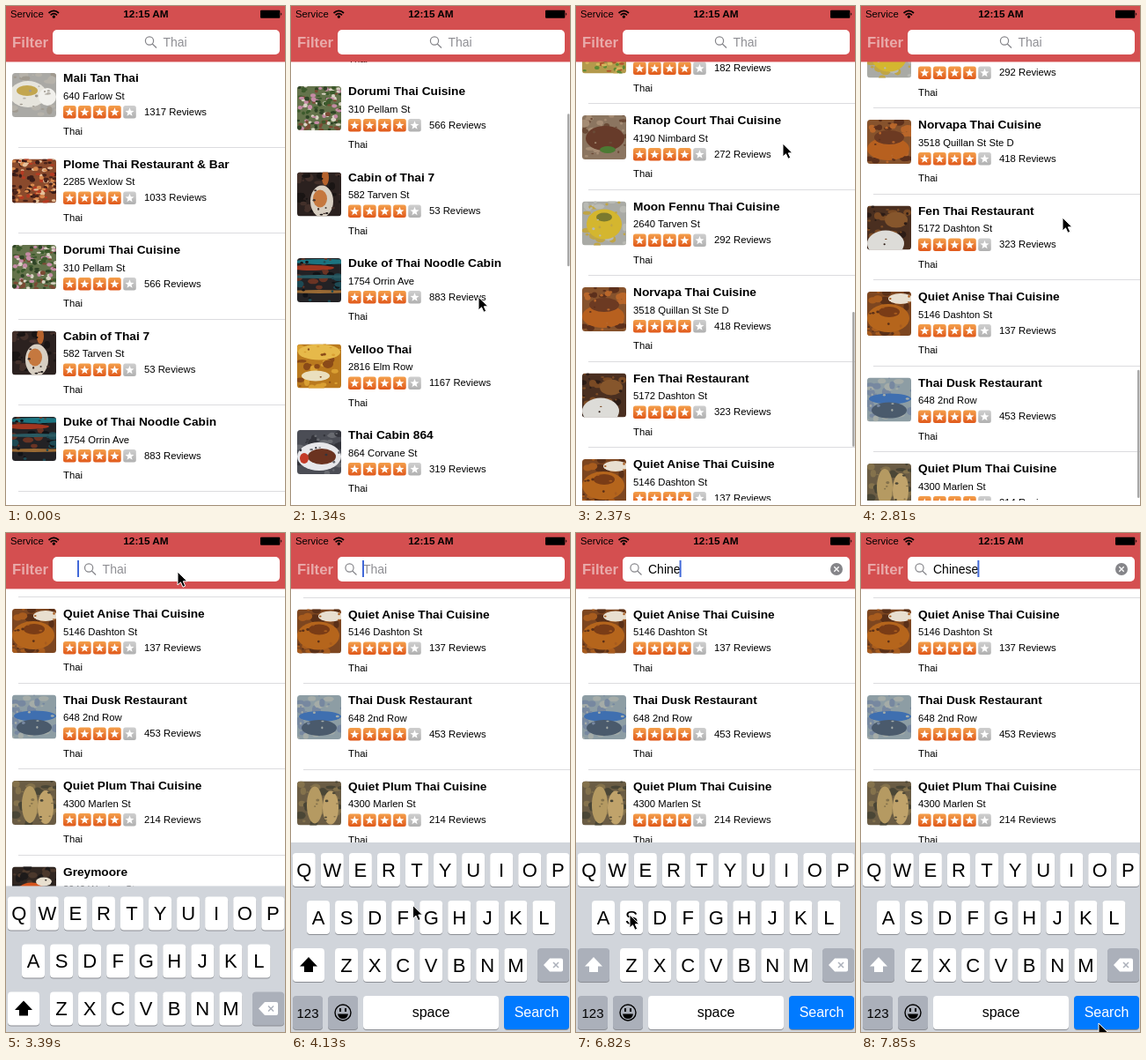
These frames come from a looping animation (317 px wide and 566 px high, 8 s). An HTML page:

```html
<!DOCTYPE html>
<html lang="en">
<head>
<meta charset="utf-8">
<title>Restaurant search</title>
<style>
  html, body { margin: 0; width: 100%; height: 100%; overflow: hidden; background: #fff; }
  svg { display: block; width: 317px; height: 566px; }
  text { font-family: "Liberation Sans", Arial, sans-serif; font-size: 11.3px; fill: #000; white-space: pre; }
  .name { font-size: 13.7px; font-weight: bold; }
  .field { font-size: 14px; }
  .hint { fill: #8e8e93; }
  .clock { font-size: 11.8px; font-weight: bold; text-anchor: middle; }
  .filter { font-size: 16.8px; font-weight: bold; fill: #e9abaa; }
  .key { font-size: 22px; text-anchor: middle; }
  .label { font-size: 16px; text-anchor: middle; }
</style>
</head>
<body>
<svg viewBox="0 0 317 566">
  <defs>
    <clipPath id="listClip"><rect y="63" width="317" height="498"/></clipPath>
    <clipPath id="photoClip"><rect width="50" height="50" rx="3.5"/></clipPath>
    <filter id="soft"><feGaussianBlur stdDeviation=".7"/></filter>
    <linearGradient id="orange" x2="0" y2="1">
      <stop stop-color="#f4a04c"/><stop offset="1" stop-color="#e0581a"/>
    </linearGradient>
    <linearGradient id="grey" x2="0" y2="1">
      <stop stop-color="#cfcfcf"/><stop offset="1" stop-color="#b0b0b0"/>
    </linearGradient>
    <path id="star" fill="#fff" d="M7.3 2.3 8.6 5.8 12.3 5.9 9.4 8.2 10.4 11.8 7.3 9.7 4.2 11.8 5.2 8.2 2.3 5.9 6 5.8Z"/>
    <g id="stars"></g>
  </defs>

  <g clip-path="url(#listClip)">
    <g id="list"><g id="lines" fill="#dcdcdf" shape-rendering="crispEdges"></g></g>
    <rect id="bar" x="314" width="2.5" rx="1.2" fill="#a8a8a8"/>
  </g>

  <rect width="317" height="63.4" fill="#d44f50"/>
  <text x="5" y="13.3">Service</text>
  <g fill="none" stroke="#000" stroke-width="1.7">
    <path d="M48.5 8Q54.3 2.8 60 8M50.6 10.3Q54.3 7 58 10.3"/>
    <circle cx="54.3" cy="12.2" r=".8"/>
  </g>
  <text class="clock" x="159" y="13.4">12:15 AM</text>
  <path d="M290 4.7h20.3q1 0 1 1v7q0 1-1 1h-20.3q-1 0-1-1v-7q0-1 1-1M312.3 7.5q2 1.700 0 3.4"/>
  <text class="filter" x="7" y="47">Filter</text>
  <rect x="53" y="27" width="258" height="28" rx="5" fill="#fff"/>
  <g id="hint">
    <g fill="none" stroke="#85858a" stroke-width="1.2"><circle cx="163" cy="39.5" r="4.6"/><path d="M166.3 43 171 47.5"/></g>
    <text id="placeholder" class="field hint" x="178.5" y="46">Thai</text>
  </g>
  <text id="query" class="field" x="82" y="46"></text>
  <rect id="caret" y="31" width="2" height="19" fill="#4168d8"/>
  <g id="clear">
    <circle cx="296" cy="41" r="7" fill="#858589"/>
    <path d="M293.3 38.3l5.4 5.4m0-5.4l-5.4 5.4" stroke="#fff" stroke-width="1.3"/>
  </g>

  <g id="keyboard"><rect y="351" width="317" height="215" fill="#d1d5db"/></g>
  <path id="cursor" d="M0 0V15L3.5 11.8 6 17.3 8.7 16.1 6.3 10.8H11Z" stroke="#fff"/>
</svg>

<script>
const FRAMES = 54, LOOP = 8000, PITCH = 97.5;
const $ = id => document.getElementById(id);

function add(parent, tag, attrs, text) {
  const node = document.createElementNS("http://www.w3.org/2000/svg", tag);
  for (const name in attrs) node.setAttribute(name, attrs[name]);
  if (text) node.textContent = text;
  return parent.appendChild(node);
}

// name, address, reviews, background, speck colours, ellipses [fill, cx, cy, rx, ry]
const rows = [
  ["Mali Tan Thai", "640 Farlow St", "1317", "#aaa9a5", "#a09a90 #b6b2aa", ["#e6e4dc", 18, 24, 21, 15], ["#c3a64f", 17, 20, 12, 6], ["#f1f0ec", 40, 27, 10, 10]],
  ["Plome Thai Restaurant & Bar", "2285 Wexlow St", "1033", "#8a4a2c", "#d98a4e #4a231a #e6c09a #b53b22 #3a1c18"],
  ["Dorumi Thai Cuisine", "310 Pellam St", "566", "#64734b", "#3c5a2c #c58ba5 #d9d4c4 #7a4a34 #2f4426"],
  ["Cabin of Thai 7", "582 Tarven St", "53", "#2b211f", "#43302a #1a1514", ["#d8cfc2", 28, 33, 13, 18], ["#c5783f", 26, 30, 8, 10], ["#b5622c", 32, 6, 4, 9]],
  ["Duke of Thai Noodle Cabin", "1754 Orrin Ave", "883", "#232225", "#1e4a54 #6a3424 #111317", ["#1c7480", 30, 4, 34, 3], ["#a2361f", 16, 11, 26, 3], ["#2a5a62", 25, 21, 34, 2], ["#9a6a34", 25, 38, 34, 2]],
  ["Velloo Thai", "2816 Elm Row", "1167", "#b9791e", "#d99f32 #8a4a18", ["#e6b94a", 25, 9, 24, 9], ["#eadfbe", 21, 36, 16, 6]],
  ["Thai Cabin 864", "864 Corvane St", "319", "#4b4d55", "#33343b #686a70", ["#e7e7ea", 25, 30, 25, 16], ["#6b3320", 28, 30, 16, 9], ["#c33a27", 8, 32, 5, 6]],
  ["Pomelu Thai Kitchen", "947 Brellin St", "205", "#9a6a3a", "#c99a55 #5c3a20"],
  ["Tavoo Thai Garden", "1530 Pellam St", "182", "#b49a4c", "#5d8a34 #d6b65c #b0532c"],
  ["Ranop Court Thai Cuisine", "4190 Nimbard St", "272", "#8b7560", "#6a4a36 #a58c74", ["#673b2a", 26, 26, 22, 14], ["#4c7a33", 29, 39, 9, 4]],
  ["Moon Fennu Thai Cuisine", "2640 Tarven St", "292", "#a9aaa5", "#c0a546 #b9bab4", ["#d4b62f", 25, 26, 20, 17], ["#7b7a2e", 25, 18, 9, 5]],
  ["Norvapa Thai Cuisine", "3518 Quillan St Ste D", "418", "#86522c", "#b8662a #5c301c", ["#b7601f", 24, 33, 24, 13], ["#6c3a22", 25, 20, 17, 8]],
  ["Fen Thai Restaurant", "5172 Dashton St", "323", "#4a2f20", "#7a4a24 #2c1c16", ["#dddcd8", 21, 43, 21, 15], ["#86562c", 33, 16, 13, 9]],
  ["Quiet Anise Thai Cuisine", "5146 Dashton St", "137", "#7d4620", "#a85c1e #5a3018", ["#e8dfd0", 38, 8, 14, 6], ["#b5651c", 24, 30, 24, 16], ["#7a3c16", 25, 23, 12, 6]],
  ["Thai Dusk Restaurant", "648 2nd Row", "453", "#8d9da4", "#7788a0 #a5aca8", ["#3f6fb0", 26, 24, 24, 6], ["#4a5a6c", 25, 37, 20, 9]],
  ["Quiet Plum Thai Cuisine", "4300 Marlen St", "214", "#6a5c44", "#84724c #4a4636", ["#b59a62", 20, 27, 9, 21], ["#c0a36b", 38, 30, 9, 19]],
  ["Greymoore", "3940 Wexlow St", "640", "#302621", "#4b382c #1d1a1a", ["#d5541d", 22, 32, 18, 14], ["#e8dfcf", 36, 17, 9, 5]]
];

function drawPhoto(parent, seed, [base, specks, ...shapes]) {
  const random = () => (seed = (seed * 16807) % 2147483647) / 2147483647;
  const frame = add(parent, "g", { transform: "translate(7 13)", "clip-path": "url(#photoClip)" });
  add(frame, "rect", { width: 50, height: 50, fill: base });
  const photo = add(frame, "g", { filter: "url(#soft)" });
  const colours = specks.split(" ");
  const blob = (fill, cx, cy, rx, ry) => add(photo, "ellipse", { fill, cx, cy, rx, ry });
  const speckle = (count, size) => {
    for (let i = 0; i < count; i++)
      blob(colours[i % colours.length], random() * 50, random() * 50, size + random() * size, size * (.6 + random()));
  };
  speckle(shapes.length ? 22 : 130, shapes.length ? 3 : 1.6);
  shapes.forEach(shape => blob(...shape));
  if (shapes.length) speckle(16, 1);
}

for (let i = 0; i < 5; i++) {
  const star = add($("stars"), "g", { transform: `translate(${65 + i * 17.05} 50)` });
  add(star, "rect", { width: 14.6, height: 14.6, rx: 2.5, fill: `url(#${i < 4 ? "orange" : "grey"})` });
  add(star, "use", { href: "#star" });
}

rows.forEach(([name, address, reviews, ...photo], i) => {
  const row = add($("list"), "g", { transform: `translate(0 ${63 + i * PITCH})` });
  drawPhoto(row, 977 * (i + 3), photo);
  add(row, "text", { class: "name", x: 65, y: 23.2 }, name);
  add(row, "text", { x: 65, y: 42.5 }, address);
  add(row, "use", { href: "#stars" });
  add(row, "text", { x: 157, y: 60.6 }, reviews + " Reviews");
  add(row, "text", { x: 65, y: 83 }, "Thai");
  add($("lines"), "rect", { x: 14, y: 62 + (i + 1) * PITCH, width: 303, height: 1 });
});

function addKey(x, y, width, fill = "#fff") {
  add($("keyboard"), "rect", { x, y: y + 1, width, height: 38, rx: 4, fill: "#8b8e94" });
  return add($("keyboard"), "rect", { x, y, width, height: 38, rx: 4, fill });
}
["QWERTYUIOP", "ASDFGHJKL", "ZXCVBNM"].forEach((letters, r) => {
  [...letters].forEach((letter, i) => {
    const x = [14.8, 31, 63][r] + i * 32.05, y = 363 + r * 54;
    addKey(x - 13, y, 26);
    add($("keyboard"), "text", { class: "key", x, y: y + 27 }, letter);
  });
});
const keyGrey = "#abb0ba";
const shiftKey = addKey(2, 471, 36);
const shiftArrow = add($("keyboard"), "path", { d: "M20 481 10 491.5H15V498H25V491.5H30Z" });
addKey(280, 471, 36, keyGrey);
add($("keyboard"), "path", { d: "M287 490 294 482.5H307Q309 482.5 309 484.5V495.5Q309 497.5 307 497.5H294Z", fill: "#fff" });
add($("keyboard"), "path", { d: "M298 487l6 6m0-6l-6 6", stroke: keyGrey, "stroke-width": 1.5 });
addKey(2, 525, 34, keyGrey);
addKey(42, 525, 34, keyGrey);
addKey(82, 525, 154);
addKey(242, 525, 74, "#007aff");
add($("keyboard"), "text", { class: "label", x: 19, y: 550, style: "font-size:15px" }, "123");
add($("keyboard"), "text", { class: "label", x: 159, y: 549 }, "space");
add($("keyboard"), "text", { class: "label", x: 279, y: 549, style: "fill:#fff" }, "Search");
add($("keyboard"), "circle", { cx: 59, cy: 544, r: 9, fill: "none", stroke: "#000", "stroke-width": 1.4 });
add($("keyboard"), "path", { d: "M53 545.5H65Q64 551 59 551T53 545.5M55 539h2v4h-2zM61 539h2v4h-2z" });

// Key positions below are [step, value...]
const scrollKeys = [[3, 0], [9, 180], [11, 250], [16, 829.5], [17.5, 865], [21, 1257.5], [24, 1257.5], [26, 1257]];
const cursorKeys = [
  [2, 216, 475], [5, 215, 460], [9, 213, 330], [11, 226, 430], [16, 235, 156], [18, 228, 330],
  [20, 230, 150], [21, 197, 46], [23, 195, 44], [25, 195, 46], [29, 128, 492], [30, 128, 492],
  [33, 190, 440], [34, 191, 440], [35, 237, 390], [37, 238, 388], [39, 224, 495], [40, 224, 495],
  [43, 79, 385], [44, 79, 385], [46, 61, 433], [47, 61, 433], [49, 79, 385], [50, 79, 385], [53, 270, 556]
];
const typedAt = [30, 34, 37, 40, 44, 47, 50];

function follow(keys, step) {
  const next = keys.findIndex(key => key[0] > step);
  if (next === 0) return keys[0].slice(1);
  if (next < 0) return keys[keys.length - 1].slice(1);
  const from = keys[next - 1], to = keys[next];
  const u = (step - from[0]) / (to[0] - from[0]), eased = u * u * (3 - 2 * u);
  return from.slice(1).map((value, i) => value + (to[i + 1] - value) * eased);
}
const move = (id, x, y) => $(id).setAttribute("transform", `translate(${x} ${y})`);
const show = (id, visible) => $(id).setAttribute("visibility", visible ? "visible" : "hidden");

function draw(step) {
  const [scroll] = follow(scrollKeys, step);
  move("list", 0, -scroll);
  show("lines", step < 3 || step > 9);

  const barTop = 60 + .346 * scroll;
  $("bar").setAttribute("y", barTop);
  $("bar").setAttribute("height", Math.min(173 - .031 * (scroll - 180), 558 - barTop));
  show("bar", step > 2 && step < 22);

  const left = 1 - Math.min(1, Math.max(0, (step - 22) / 2.15));
  move("hint", -96.5 * (1 - left ** 2), 0);
  move("keyboard", 0, 215 * left ** 2.35);
  show("keyboard", left < 1);

  const typed = "Chinese".slice(0, typedAt.filter(at => at <= step).length);
  $("query").textContent = typed;
  show("placeholder", !typed);
  show("clear", typed);
  show("caret", left < 1);
  $("caret").setAttribute("x", 81 + (typed ? $("query").getComputedTextLength() : 0));
  shiftKey.setAttribute("fill", typed ? keyGrey : "#fff");
  shiftArrow.setAttribute("fill", typed ? "#fff" : "#000");

  move("cursor", ...follow(cursorKeys, step));
  show("cursor", step >= 2);
}

const start = performance.now();
function tick() {
  const time = Math.max(0, performance.now() - start) % LOOP;
  draw(Math.min(FRAMES - 1, Math.floor(time * FRAMES / LOOP + .15)));
  requestAnimationFrame(tick);
}
tick();
</script>
</body>
</html>
```
